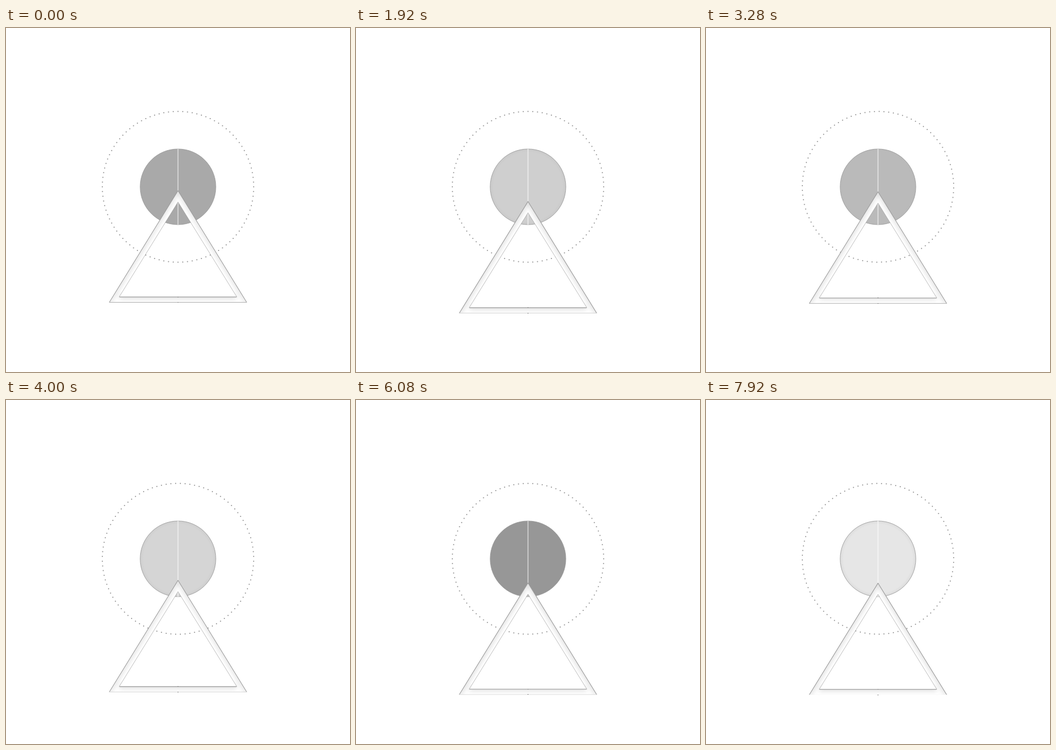
Animation of 600x600 px, one loop 8000 ms. Source, as an HTML page with a canvas:

```html
<!DOCTYPE html>
<html lang="en">
<head>
<meta charset="utf-8">
<title>Disc and triangle</title>
<style>
  html, body { margin: 0; width: 100%; height: 100%; overflow: hidden; background: #fff; }
  canvas { display: block; width: 600px; height: 600px; }
</style>
</head>
<body>
<canvas id="stage" width="600" height="600"></canvas>
<script>
const ctx = document.getElementById('stage').getContext('2d');
const LOOP = 8000, STEP = 80, TAU = 2 * Math.PI;
const CX = 300, CY = 277, R = 66, ORBIT = 132, DOTS = 100;
const BOB = 1800, HIGH = 478.5, LOW = 514.6;
const REST = 1200, FADE = 200;

const mix = (a, b, k) => a + (b - a) * k;
const easeOut = k => Math.sqrt(1 - (1 - k) ** 2.2);

function gray(v, alpha = 1) {
  const c = Math.round(v);
  return `rgba(${c},${c},${c},${alpha})`;
}

function line(x1, y1, x2, y2, color, width) {
  ctx.beginPath();
  ctx.moveTo(x1, y1);
  ctx.lineTo(x2, y2);
  ctx.strokeStyle = color;
  ctx.lineWidth = width;
  ctx.stroke();
}

function addTriangle(path, half, top, base) {
  path.moveTo(CX, top);
  path.lineTo(CX + half, base);
  path.lineTo(CX - half, base);
  path.closePath();
}

// Sinks and rises again, each half with the same ease-out
function baseAt(t) {
  const half = BOB / 2, p = t % BOB;
  const k = easeOut(p % half / half);
  return p < half ? mix(HIGH, LOW, k) : mix(LOW, HIGH, k);
}

// The disc pulses in grey and empties once in every bob
function discAt(t) {
  const cover = Math.min(1, Math.abs(t % BOB - REST) / FADE);
  const pulse = 191 - 40 * Math.cos(TAU * (t - 6080) / 1255);
  const open = (1 + Math.cos(TAU * (t - REST) / (4 * BOB))) / 2;
  return { cover, open, tone: mix(255, pulse, cover) };
}

function drawDots(t) {
  ctx.fillStyle = gray(145);
  for (let i = 0; i < DOTS; i++) {
    const a = TAU * (i / DOTS + t / LOOP / 4 - 1 / 4);
    ctx.beginPath();
    ctx.arc(CX + ORBIT * Math.cos(a), CY + (ORBIT - .5) * Math.sin(a), 1, 0, TAU);
    ctx.fill();
  }
}

function drawDisc(t) {
  const { cover, open, tone } = discAt(t);
  const shade = ctx.createRadialGradient(CX, CY, R - 6, CX, CY, R);
  shade.addColorStop(0, gray(tone));
  shade.addColorStop(1, gray(tone - cover * Math.max(0, tone - 180) / 5));
  ctx.beginPath();
  ctx.arc(CX, CY, R, 0, TAU);
  ctx.fillStyle = shade;
  ctx.fill();
  ctx.strokeStyle = gray(150, .8 * Math.max(cover, open));
  ctx.lineWidth = 1;
  ctx.stroke();

  const top = CY - R - .5, end = CY + R + .5;
  const gap = 2 * open * (1 - cover);
  if (gap > .5) {
    line(CX, top, CX, end, gray(215), 2 * gap);
    for (const s of [-gap, gap]) line(CX + s, top, CX + s, end, gray(160), 1.2);
  } else {
    line(CX, top, CX, end, gray(mix(165, mix(tone, 255, .6), cover)), 2 - .4 * cover);
  }
}

function drawTriangle(t) {
  const base = baseAt(t);
  const outerTop = base - 195, innerTop = base - 175, innerBase = base - 9.5;
  const band = new Path2D();
  addTriangle(band, 120, outerTop, base);
  addTriangle(band, 102.5, innerTop, innerBase);
  ctx.fillStyle = '#fff';
  ctx.fill(band, 'evenodd');

  // soft shading inside the band
  ctx.save();
  ctx.clip(band, 'evenodd');
  ctx.shadowColor = gray(0, .6);
  ctx.shadowBlur = 8;
  for (const s of [-1, 1]) line(CX, outerTop, CX + 120 * s, base, gray(170), 1.4);
  line(CX - 102, innerBase, CX + 102, innerBase, gray(170), 1.4);
  ctx.restore();

  for (const s of [-1, 1]) {
    line(CX, outerTop, CX + 120 * s, base, gray(140, .75), .9);
    line(CX, innerTop, CX + 102.5 * s, innerBase, gray(140, .7), .8);
  }
  line(CX - 102.5, innerBase, CX + 102.5, innerBase, gray(160), 1);
  // the lower edge shows only between whole pixels
  line(CX - 120, base, CX + 120, base, gray(175, Math.sin(Math.PI * base) ** 2), 1);

  ctx.fillStyle = gray(140);
  for (const y of [innerBase, base]) ctx.fillRect(CX - 1, Math.floor(y), 2, 1);
}

function draw(now) {
  const t = Math.floor(now % LOOP / STEP) * STEP;
  ctx.fillStyle = '#fff';
  ctx.fillRect(0, 0, 600, 600);
  drawDots(t);
  drawDisc(t);
  drawTriangle(t);
}

let start = null;
function tick(now) {
  if (start === null) start = now;
  draw(now - start);
  requestAnimationFrame(tick);
}
draw(0);
requestAnimationFrame(tick);
</script>
</body>
</html>
```
